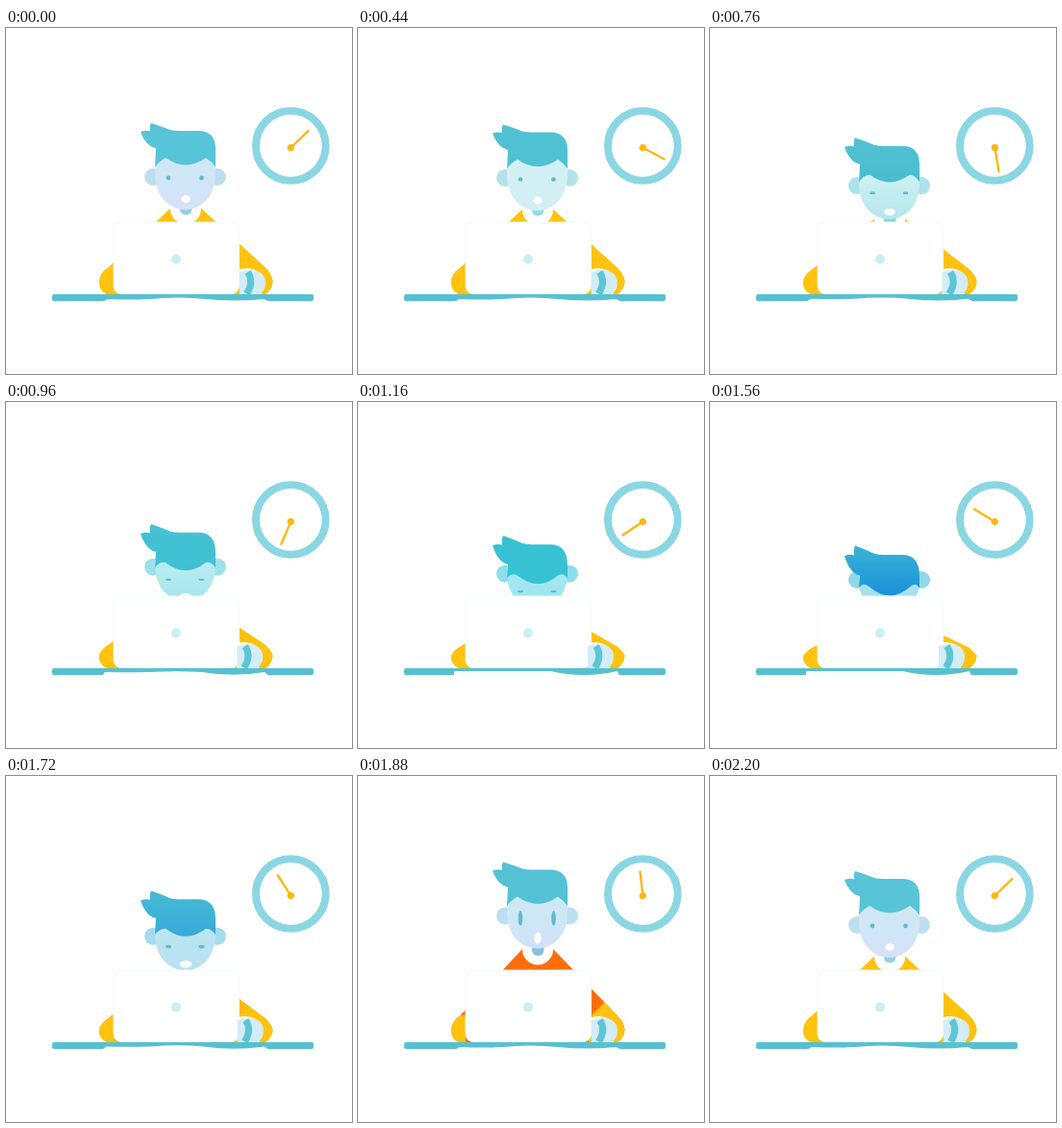
These frames come from a looping animation (360 by 360 pixels, 3080 ms). An HTML page:

```html
<!DOCTYPE html>
<html lang="en">
<head>
<meta charset="utf-8">
<title>Nodding off at work</title>
<style>
  html, body { margin: 0; width: 100%; height: 100%; overflow: hidden; background: #fff; }
  svg { display: block; width: 100vw; height: 100vh; }
</style>
</head>
<body>
<svg viewBox="0 0 360 360">
  <defs>
    <linearGradient id="hairFill" x2="0" y2="1"><stop/><stop offset="1"/></linearGradient>
    <linearGradient id="faceFill" x2="0" y2="1"><stop offset=".3"/><stop offset="1"/></linearGradient>
    <clipPath id="forearms"><path d="M90 249H112V280H90ZM240 252L264 228H290V280H240Z"/></clipPath>
  </defs>

  <circle cx="296.3" cy="122.5" r="36.3" fill="#fff" stroke="#8bd6e3" stroke-width="8"/>
  <circle cx="296.3" cy="122.5" r="32" fill="none" stroke="#e3f5f8"/>
  <g id="hand" fill="#fbb80f">
    <circle cx="296.3" cy="124.5" r="3.6"/>
    <path d="M295.2 124.5L295.1 99Q296.3 97 297.5 99L297.4 124.5Z"/>
  </g>

  <rect x="48" y="277" width="272" height="7" rx="2" fill="#56c0d1"/>
  <path id="underside" fill="#fff"/>

  <path id="torso"/>
  <path id="sleeves" fill="#ffc20e" clip-path="url(#forearms)"/>
  <g id="collar">
    <circle cx="187" cy="188" r="16" fill="#fff"/>
    <rect id="neck" x="181" y="176" width="12.5" height="18.5" rx="6"/>
  </g>

  <g id="ears">
    <circle cx="153" cy="155" r="9"/>
    <circle cx="220" cy="155" r="9"/>
  </g>
  <path id="face" fill="url(#faceFill)" d="M155 146L166 130H208L218 146V152C218 174 204 189 186.500 189S155 174 155 152Z"/>
  <g id="eyes" fill="#62b9cf">
    <ellipse cx="169" cy="156"/>
    <ellipse cx="203.500" cy="156"/>
  </g>
  <ellipse id="mouth" cx="187" fill="#fff"/>
  <path id="hair" fill="url(#hairFill)"/>

  <rect x="112" y="202" width="130.500" height="74.500" rx="8" fill="#fff" stroke="#f0f8fa"/>
  <circle cx="177" cy="240.500" r="5" fill="#cbeef2"/>

  <g id="cuff">
    <path d="M243 277V251Q253 248 262 253L266 277Z" fill="#fff"/>
    <path d="M243 277V254Q255 250 264 254Q270 258 270 265Q270 273 264 277Z" fill="#d3ecf5"/>
    <path d="M251.500 254Q258.500 264 250.500 276.500" fill="none" stroke="#5cc6d6" stroke-width="7"/>
  </g>
</svg>
<script>
const LOOP = 3080, ACTIVE = 2200, STEP = 40;
const $ = id => document.getElementById(id);
const mix = (a, b, k) => a + (b - a) * k;
const ease = (t, from, to) => {
  const k = Math.min(1, Math.max(0, (t - from) / (to - from)));
  return (1 - Math.cos(Math.PI * k)) / 2;
};
const shift = (id, x, y) => $(id).setAttribute('transform', `translate(${x} ${y})`);
const set = (el, attrs) => { for (const k in attrs) el.setAttribute(k, attrs[k]); };

// time, hair top, hair bottom, face top, face bottom, ears, neck
const tints = [
  [0, '#58c4d7', '#58c4d7', '#cfe7f5', '#d5e1fa', '#bcdff0', '#96cfe2'],
  [440, '#50c1d2', '#50c1d2', '#d3f0f4', '#d3eff4', '#b4e2ea', '#98d8e4'],
  [760, '#52c2d3', '#48bdce', '#cbf0f2', '#b4e6ec', '#ace2ea', '#8ad4df'],
  [1160, '#38c1d2', '#36c2d5', '#a8e8f0', '#98e4ef', '#8cdfea', '#8ad4df'],
  [1560, '#38b4d4', '#1b90db', '#a9e2ee', '#a2dfed', '#8ed8e8', '#8ad4df'],
  [1880, '#54c1d5', '#54c1d5', '#cde8f4', '#d0e2f7', '#b8e0f0', '#86c0e0'],
  [2200, '#58c4d7', '#58c4d7', '#cfe7f5', '#d5e1fa', '#bcdff0', '#96cfe2']
];
const rgb = hex => [1, 3, 5].map(i => parseInt(hex.slice(i, i + 2), 16));
const blend = (a, b, k) => {
  const to = rgb(b);
  return `rgb(${rgb(a).map((v, i) => Math.round(mix(v, to[i], k)))})`;
};
function tintsAt(t) {
  const i = Math.max(1, tints.findIndex(row => row[0] >= t));
  const a = tints[i - 1], b = tints[i];
  const k = (t - a[0]) / (b[0] - a[0]);
  return a.slice(1).map((c, j) => blend(c, b[j + 1], k));
}

// wavy lower edge of the desk: awake and asleep
const awakeEdge = [100, 285, 106, 282, 128, 283, 150, 282, 180, 279, 208, 282, 238, 285, 268, 282, 275, 285];
const asleepEdge = [100, 285, 100, 280, 125, 280, 150, 280, 175, 280, 200, 280, 235, 288, 270, 280, 272, 285];
function underside(k) {
  const p = awakeEdge.map((v, i) => mix(v, asleepEdge[i], k));
  return `M${p.slice(0, 2)}L${p.slice(2, 4)}Q${p.slice(4, 8)}Q${p.slice(8, 12)}Q${p.slice(12, 16)}L${p.slice(16)}Z`;
}

function bodyPath(shoulder, elbow) {
  return `M170.500 ${shoulder}L106 ${elbow}Q97 ${elbow + 6} 97 265Q97 273 105 277H270
    Q277 272 277.500 264Q277 ${elbow + 7} 270 ${elbow}L203.500 ${shoulder}Z`;
}

function hairPath(side) {
  return `M155 ${side}L156 125C149 124 143 117 140 108Q146 106 150 107.500Q149 102 151 99
    Q161 102 171 106Q175 107 180 107H200Q218 107 218 126V${side}
    Q214 ${side - 6} 208 135Q187 150 166 135Q159 ${side - 6} 155 ${side}Z`;
}

function draw(t) {
  const nod = ease(t, 305, 1530) * (1 - ease(t, 1600, 1820));
  const jolt = ease(t, 1680, 1870) * (1 - ease(t, 1900, 2200));
  const lift = -9.5 * jolt;
  const bodyShift = 36 * nod - 7.5 * jolt;

  set($('hand'), { transform: `rotate(${46 + 360 * t / ACTIVE} 296.3 124.5)` });
  set($('underside'), { d: underside(Math.min(1, nod * 1.3) ** 2) });

  const body = bodyPath(188 + bodyShift, 249.5 + 6.5 * nod);
  set($('torso'), { d: body, fill: blend('#ffc20e', '#ff6e0a', jolt) });
  set($('sleeves'), { d: body });
  shift('collar', 0, bodyShift);
  shift('cuff', -5 * nod, 0);

  shift('ears', 0, 30 * nod + lift);
  shift('face', 0, 33 * nod + lift);
  const hairScale = 1 + .2 * nod;
  set($('hair'), {
    d: hairPath(145 - 9 * nod),
    transform: `translate(0 ${52 * nod + lift + 107 * (1 - hairScale)}) scale(1 ${hairScale})`
  });

  const squint = Math.min(1, nod * 2.2);
  shift('eyes', 0, 52 * nod + 1.5 * jolt + lift);
  for (const eye of $('eyes').children)
    set(eye, { rx: mix(2.3, 3.2, squint), ry: mix(2.4, 1.1, squint) + 5.4 * jolt });
  set($('mouth'), {
    cy: 178 + 44 * nod + lift,
    rx: 4.6 + 2 * squint - jolt,
    ry: 3.9 - .4 * squint + 2.2 * jolt
  });

  const [hairTop, hairEnd, faceTop, faceEnd, ears, neck] = tintsAt(t);
  const fillStops = (id, ...colors) =>
    colors.forEach((c, i) => set($(id).children[i], { 'stop-color': c }));
  fillStops('hairFill', hairTop, hairEnd);
  fillStops('faceFill', faceTop, faceEnd);
  set($('ears'), { fill: ears });
  set($('neck'), { fill: neck });
}

const start = performance.now();
function tick() {
  const t = (performance.now() - start) % LOOP;
  draw(Math.min(ACTIVE, Math.floor(t / STEP) * STEP));
  requestAnimationFrame(tick);
}
tick();
</script>
</body>
</html>
```
